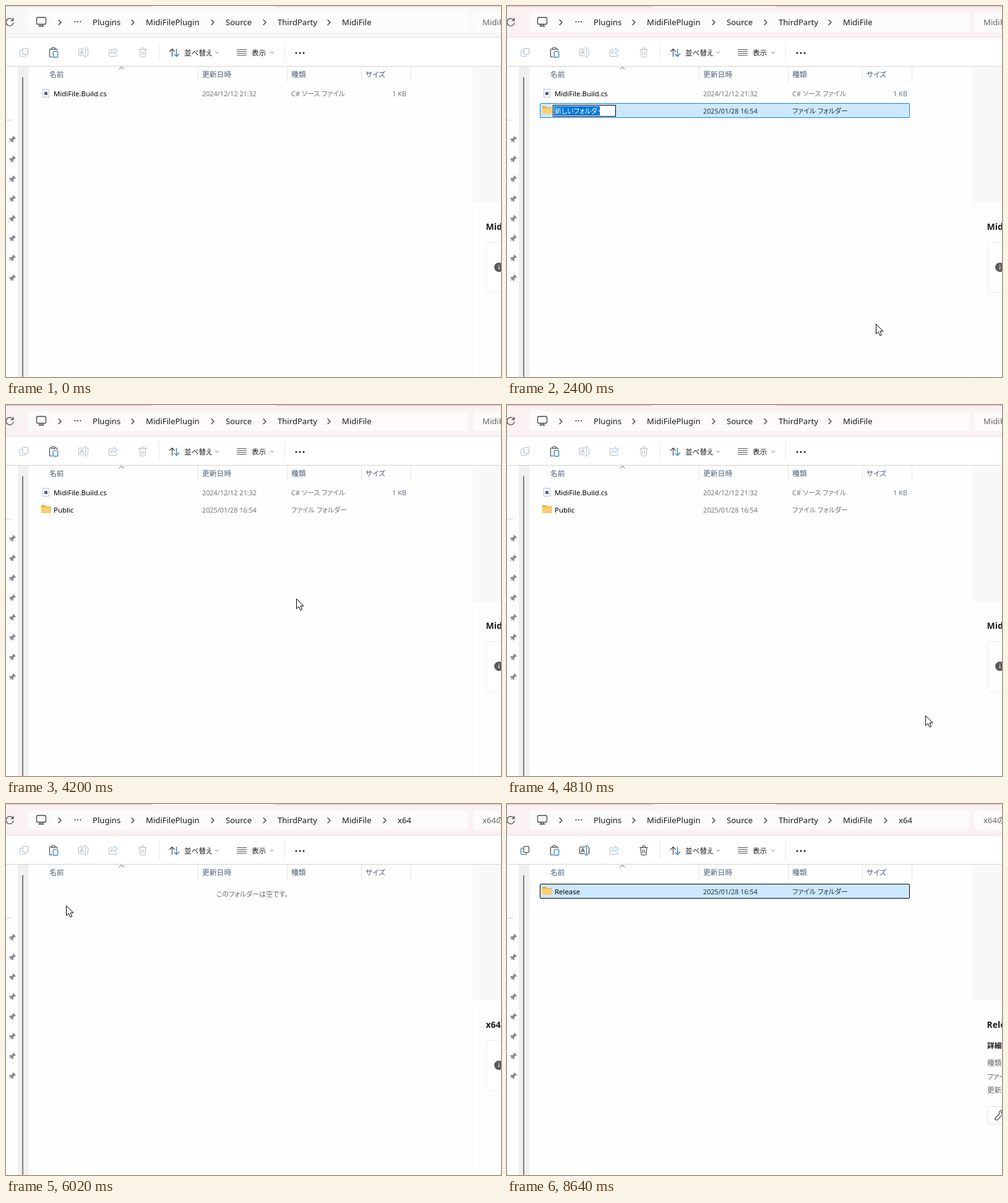
Recreate the animation shown at these times as an HTML page. Size 800 by 600 pixels, loop 8.84 s.

```html
<!DOCTYPE html>
<html lang="ja">
<head>
<meta charset="utf-8">
<title>Creating folders</title>
<style>
  html, body { margin: 0; width: 100%; height: 100%; overflow: hidden; background: #fefefe; }
  svg { display: block; width: 800px; height: 600px; }
  text {
    font: 11px 'Noto Sans', 'Noto Sans CJK JP', 'Noto Sans CJK', sans-serif;
    font-feature-settings: "palt";
    white-space: pre;
  }
  .crumb { font-size: 13.1px; fill: #1b1b1b; }
  .head { font-size: 11.8px; fill: #4c607a; }
  .tool { font-size: 11.6px; fill: #1b1b1b; }
  .name { font-size: 11.4px; fill: #000; }
  .date { font-size: 10.8px; }
  .bold { font-weight: 600; fill: #1b1b1b; }
  .line { fill: none; stroke-linecap: round; stroke-linejoin: round; }
</style>
</head>
<body>
<svg viewBox="0 0 800 600">
  <g id="window"></g>
  <g id="content"></g>
  <path id="cursor" d="M.5 .5V16.5L4.3 13L7 19L9.6 17.9L7 12H12Z" fill="#fff" stroke="#000" stroke-linejoin="round"/>
</svg>
<script>
const LOOP = 8840;
const NEW_NAME = '新しいフォルダー';
const $ = id => document.getElementById(id);

// All moments below are counted in ticks of about 200 ms.
const folders = [
  { name: 'Public',  row: 1, made: 12, typeFrom: 12, typeTo: 16, done: 17, titled: 18, deselected: 20, gone: 30 },
  { name: 'x64',     row: 2, made: 25, typeFrom: 25, typeTo: 26, done: 28, titled: 28, deselected: 30, gone: 30 },
  { name: 'Release', row: 0, made: 37, typeFrom: 39, typeTo: 42, done: 43, titled: 43, deselected: 99, gone: 99 }
];
const OPENED = 30;
const cursorPath = [
  [1, 560, 575], [5, 330, 265], [7, 330, 265], [10, 596, 514], [17, 596, 514], [20, 400, 250],
  [24, 676, 502], [27, 676, 502], [28, 97, 164], [31, 97, 164], [34, 225, 125], [36, 518, 362], [39, 518, 362]
];

const rect = (x, y, w, h, fill, more = '') => `<rect x="${x}" y="${y}" width="${w}" height="${h}" fill="${fill}" ${more}/>`;
const text = (x, y, s, cls = '', more = '') => `<text x="${x}" y="${y}" class="${cls}" ${more}>${s}</text>`;
const line = (d, color, width = 1) => `<path class="line" d="${d}" stroke="${color}" stroke-width="${width}"/>`;
const dots = (x, y, gap, r) => [0, 1, 2].map(i => `<circle cx="${x + i * gap}" cy="${y}" r="${r}" fill="#1b1b1b"/>`).join('');
const chevronRight = x => line(`M${x - 2} 22.5l4 4l-4 4`, '#333', 1.2);
const chevronDown = x => line(`M${x - 2.5} 74l2.5 2.5l2.5 -2.5`, '#777');

function addressBar(active, opened) {
  const crumbs = [['Plugins', 140], ['MidiFilePlugin', 226], ['Source', 355], ['ThirdParty', 439], ['MidiFile', 543]];
  const arrows = [87, 205, 334, 418, 522];
  if (opened) { crumbs.push(['x64', 633]); arrows.push(612); }
  const edge = active ? '#e9cdd0' : '#dcdcdc';
  const field = active ? '#fdfafa' : '#fcfcfc';
  return rect(0, 0, 800, 50, active ? '#f9f1f2' : '#f8f8f8')
    + rect(0, 0, 236, 1.6, edge) + rect(435, 0, 365, 1.6, edge)
    + rect(0, 50, 800, 1, active ? '#ecdcdd' : '#e2e2e2')
    + rect(36, 10, 711, 32, field, 'rx="4"') + rect(755, 10, 60, 32, field, 'rx="4"')
    + line('M11.3 23.2A6 6 0 1 0 12 27M11.8 19.8V23.6H8', '#444', 1.2)
    + line('M51.5 18.5h11q2 0 2 2v7q0 2-2 2h-11q-2 0-2-2v-7q0-2 2-2M55 30v2.5M59 30v2.5M53 32.5h8', '#444', 1.3)
    + arrows.map(chevronRight).join('') + dots(111.5, 25.5, 4.4, 1)
    + crumbs.map(([s, x]) => text(x, 31, s, 'crumb')).join('')
    + text(770, 31, (opened ? 'x64' : 'MidiFile') + 'の検索', 'crumb', 'style="fill:#666"');
}

function toolbar(enabled) {
  const dark = enabled ? '#3b3b3b' : '#b9bcc0';
  const blue = enabled ? '#1976c5' : '#a9cdea';
  return rect(0, 51, 800, 46, '#fff') + rect(0, 97, 800, 1, '#d2d2d2')
    + line('M26 71.5h-2q-1.5 0-1.5 1.5v7q0 1.5 1.5 1.5h6q1.5 0 1.5-1.5v-.5', blue, 1.2)
    + line('M28.5 68.5h5.5q1.5 0 1.5 1.5v7q0 1.5-1.5 1.5h-5.5q-1.5 0-1.5-1.5v-7q0-1.5 1.5-1.5', dark, 1.2)
    + line('M73 69.5h-1.5q-1 0-1 1v11q0 1 1 1h3M80 69.5h1.5q1 0 1 1v1M74 67.5h5v3h-5z', '#444', 1.2)
    + line('M77.5 73.5h5q1.2 0 1.2 1.2v7q0 1.2-1.2 1.2h-5q-1.2 0-1.2-1.2v-7q0-1.2 1.2-1.2', '#1976c5', 1.2)
    + line('M126 69.5h-7q-1.5 0-1.5 1.5v8q0 1.5 1.5 1.5h7M131 69.5q1.5 0 1.5 1.5v8q0 1.5-1.5 1.5M119.8 78l2.7-6.5l2.7 6.5M120.7 76h3.6', dark, 1.1)
    + line('M126.5 67.5h4M128.5 67.5v15M126.5 82.5h4', blue, 1.2)
    + line('M171 70.5h-3q-1.5 0-1.5 1.5v8q0 1.5 1.5 1.5h9q1.5 0 1.5-1.5v-2', '#b9bcc0', 1.1)
    + line('M175 68l5 4.5l-5 4.5v-2.5q-4 0-5.5 3q0-6 5.5-7z', '#a9cdea', 1.1)
    + line('M214.5 70.5h13M218.5 70q0-2.5 2.5-2.5t2.5 2.5M216 70.5l1 11q.2 1 1.2 1h5.6q1 0 1.2-1l1-11M219.5 74v5M222.5 74v5', dark, 1.1)
    + rect(247, 59, 1, 31, '#e8e8e8') + rect(450, 59, 1, 31, '#e8e8e8')
    + line('M268.5 81.5v-12M264.5 73.5l4-4l4 4', '#444', 1.2)
    + line('M275.5 69.5v12M271.8 77.8l3.7 3.7l4-4', '#1976c5', 1.2)
    + text(288, 79.5, '並べ替え', 'tool') + chevronDown(341)
    + line('M373.5 70.5h15M373.5 73.5h15M373.5 76.5h15M373.5 79.5h15', '#555')
    + text(397, 79.5, '表示', 'tool') + chevronDown(430) + dots(469, 76, 6, 1.5);
}

function sidebar() {
  const pin = y => `<path transform="translate(10 ${y}) rotate(45)" fill="#868a93" d="M-3-5.5h6v1.5l-1 .5v3l2 2v1.5h-3.3l-.7 4l-.7-4h-3.3v-1.5l2-2v-3l-1-.5z"/>`;
  return rect(0, 184, 10, 1, '#d4d4d4') + rect(19, 98, 17, 502, '#f0f0f0') + rect(37, 98, 1, 502, '#f6f6f6')
    + rect(26, 115, 2, 485, '#7d7d7d', 'rx="1"')
    + Array.from({ length: 8 }, (_, i) => pin(216 + 32 * i)).join('');
}

function listHeader() {
  return [310, 454, 574, 654].map(x => rect(x, 98, 1, 25, '#e4e4e4')).join('')
    + line('M183 102l3.5-3.5l3.5 3.5', '#555')
    + [['名前', 70], ['更新日時', 317], ['種類', 461], ['サイズ', 581]].map(([s, x]) => text(x, 114.5, s, 'head')).join('');
}

const cells = (y, date, kind, color) =>
  text(317, y, date, 'date', `fill="${color}"`) + text(461, y, kind, '', `fill="${color}"`);

function sourceFile() {
  return rect(59.5, 134.5, 10, 13, '#fbfcff', 'stroke="#b4c3d6"') + rect(62, 139, 5, 5, '#5b56a6')
    + text(77, 146, 'MidiFile.Build.cs', 'name') + cells(146, '2024/12/12 21:32', 'C# ソース ファイル', '#747474')
    + text(647, 146, '1 KB', 'date', 'text-anchor="end" fill="#6b7885"');
}

function folderRow(f, tick) {
  const top = 129 + 28 * f.row, base = top + 17;
  const selected = tick < f.deselected, editing = tick < f.done;
  let out = '';
  if (selected) out += rect(53.5, top + .5, 597, 23, '#cce8ff', `rx="1.5" stroke="${editing ? '#1683d8' : '#000'}"`);
  out += `<path d="M57 ${top + 6}q0-1 1-1h4.5l2 2h7.5q1 0 1 1v3h-16z" fill="#e5a83b"/>`
    + rect(57, top + 8, 16, 10, '#f9cf6f', 'rx="1"');
  if (editing) {
    const progress = Math.max(0, Math.min(1, (tick - f.typeFrom) / (f.typeTo - f.typeFrom)));
    const typed = f.name.slice(0, Math.round(f.name.length * progress));
    out += rect(74.5, top + 3.5, 101, 18, '#fff', 'stroke="#000"');
    if (!typed) out += rect(76, top + 5, 74, 15, '#0078d7');
    out += text(77, base, typed || NEW_NAME, typed ? 'name' : '', typed ? '' : 'fill="#fff"');
  } else out += text(77, base, f.name, 'name');
  return out + cells(base, '2025/01/28 16:54', 'ファイル フォルダー', selected ? '#26333f' : '#747474');
}

function details(selected, tick) {
  const title = s => text(775.5, 361.5, s, 'bold', 'style="font-size:14px"');
  const frame = rect(753, 98, 1, 502, '#f4f4f4') + rect(755, 98, 45, 220, '#f8f8f8');
  if (!selected) return frame + title(tick < OPENED ? 'MidiFile' : 'x64')
    + rect(776.5, 382.5, 60, 81, '#fff', 'rx="4" stroke="#ececec"')
    + '<circle cx="796.5" cy="422.5" r="7.5" fill="#5a5a5a"/>' + rect(796, 421, 1.2, 5, '#fff') + rect(796, 418.5, 1.2, 1.3, '#fff');
  return frame + title(tick >= selected.titled ? selected.name : NEW_NAME)
    + text(776, 394.5, '詳細', 'bold', 'style="font-size:11.8px"')
    + [['種類', 422.5], ['ファイルの場所', 444.5], ['更新日時', 466.5]].map(([s, y]) => text(776, y, s, '', 'fill="#666" style="font-size:11.6px"')).join('')
    + rect(776.5, 489.5, 60, 28, '#fff', 'rx="4" stroke="#e0e0e0"')
    + line('M789.5 507.5l6-6q-1-4 2-5.5q2-1 4-.3l-3 3l2 2l3-3q1 5-4 6l-7 7q-1.5 1-3-.2t0-3', '#444', 1.2);
}

function drawScene(tick) {
  const opened = tick >= OPENED;
  const shown = folders.filter(f => tick >= f.made && tick < f.gone);
  const selected = shown.find(f => tick > f.made && tick < f.deselected);
  $('window').innerHTML = addressBar(tick > 0, opened) + toolbar(selected) + sidebar() + listHeader() + details(selected, tick);
  $('content').innerHTML = (opened ? '' : sourceFile()) + shown.map(f => folderRow(f, tick)).join('')
    + (opened && !shown.length ? text(340, 150, 'このフォルダーは空です。', '', 'fill="#6d6d6d"') : '');

  const next = cursorPath.findIndex(p => p[0] >= tick);
  const visible = tick > 0 && next >= 0;
  $('cursor').style.display = visible ? '' : 'none';
  if (visible) {
    const b = cursorPath[next], a = cursorPath[Math.max(0, next - 1)];
    const k = a === b ? 0 : (tick - a[0]) / (b[0] - a[0]);
    const at = i => Math.round(a[i] + (b[i] - a[i]) * k);
    $('cursor').setAttribute('transform', `translate(${at(1)} ${at(2)})`);
  }
}

let lastTick = -1;
function play() {
  const t = performance.now() % LOOP;
  const tick = Math.min(43, Math.floor(t < 4700 ? t / 200 : (t + 20) / 200.9));
  if (tick !== lastTick) drawScene(lastTick = tick);
  requestAnimationFrame(play);
}
play();
</script>
</body>
</html>
```
